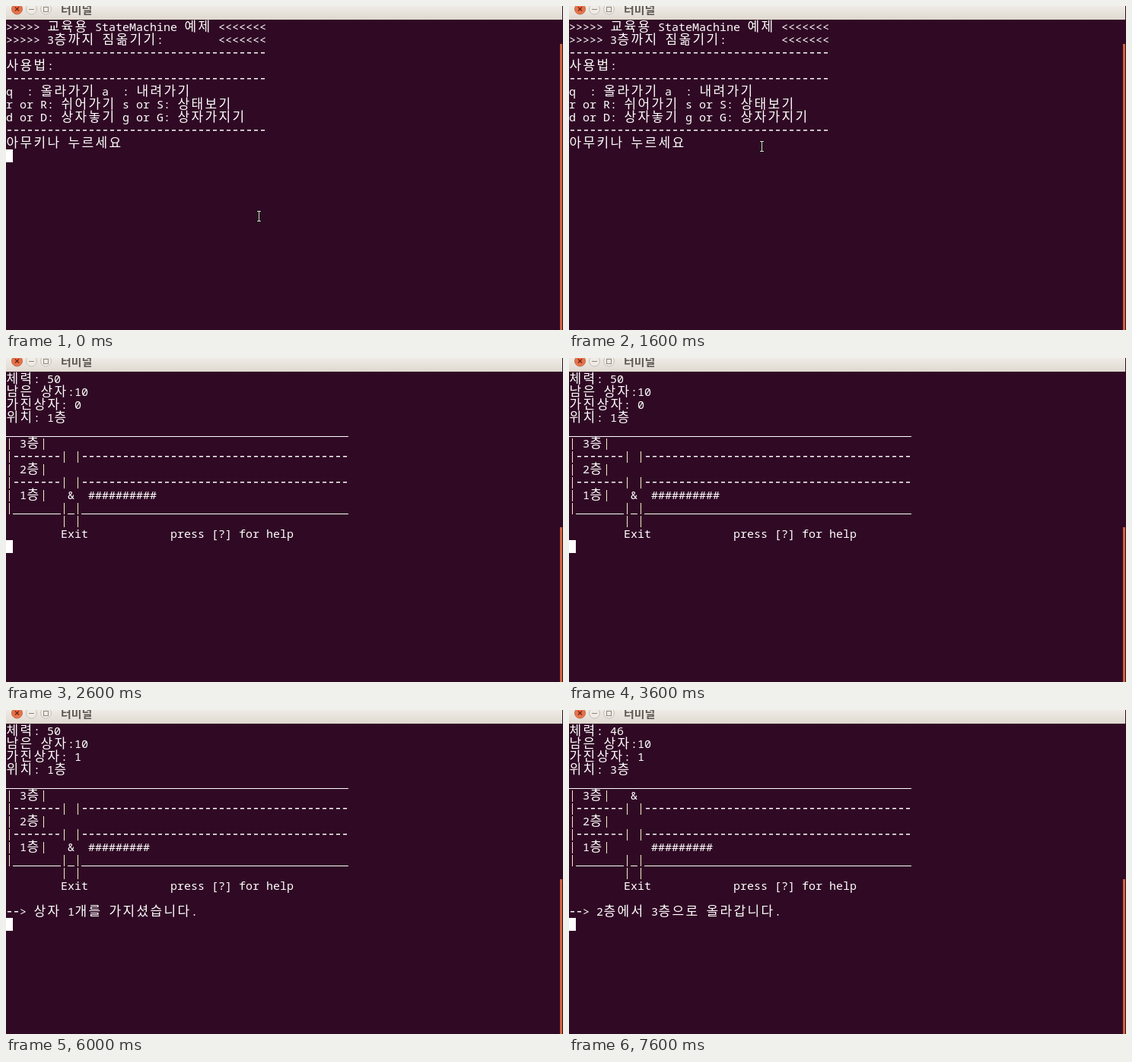
An HTML page with a canvas that plays this animation: 732 by 427 pixels, repeating every 8 s.

```html
<!DOCTYPE html>
<html lang="ko">
<head>
<meta charset="utf-8">
<style>
html, body { margin: 0; width: 100%; height: 100%; overflow: hidden; background: #300a24; }
canvas { display: block; }
</style>
</head>
<body>
<canvas id="stage" width="732" height="427"></canvas>
<script>
const ctx = document.getElementById('stage').getContext('2d');
const LOOP = 8000, CELL = 9, LINE = 17, TOP = 19;
const BG = '#300a24', INK = '#ffffff';
const MONO = '500 15px "Noto Sans Mono", "DejaVu Sans Mono", monospace';
const HANGUL = '500 17px "Noto Sans CJK KR", "Noto Sans CJK", sans-serif';

const rule = '-'.repeat(38);
const intro = [
  '>>>>> 교육용 StateMachine 예제 <<<<<<<',
  '>>>>> 3층까지 짐옮기기:' + ' '.repeat(8) + '<<<<<<<',
  rule,
  '사용법:',
  rule,
  'q  : 올라가기 a  : 내려가기',
  'r or R: 쉬어가기 s or S: 상태보기',
  'd or D: 상자놓기 g or G: 상자가지기',
  rule,
  '아무키나 누르세요'
];

function building({ hp = 50, held = 0, floor = 1, note = '' }) {
  const level = n => `| ${n}층|   ${n === floor ? '&' : ' '}  ` +
    (n === 1 ? '#'.repeat(10 - held) : '');
  const slab = '|-------| |' + '-'.repeat(39);
  const lines = [
    `체력: ${hp}`,
    '남은 상자:10',
    `가진상자: ${held}`,
    `위치: ${floor}층`,
    '_'.repeat(50),
    level(3), slab, level(2), slab, level(1),
    '|_______|_|' + '_'.repeat(39),
    '        | |',
    '        Exit' + ' '.repeat(12) + 'press [?] for help'
  ];
  if (note) lines.push('', '--> ' + note);
  return lines;
}

const screens = [
  [0, intro],
  [2600, building({})],
  [6000, building({ held: 1, note: '상자 1개를 가지셨습니다.' })],
  [7000, building({ hp: 48, held: 1, floor: 2, note: '1층에서 2층으로 올라갑니다.' })],
  [7600, building({ hp: 46, held: 1, floor: 3, note: '2층에서 3층으로 올라갑니다.' })]
];
const typed = [[0, ''], [5400, 'g'], [6000, ''], [6800, 'q'], [7000, ''], [7400, 'q'], [7600, '']];
const blink = [
  [0, 1], [600, 0], [1000, 1], [1600, 0], [2200, 1], [3000, 0], [3600, 1],
  [4200, 0], [4800, 1], [6400, 0], [6800, 1]
];
const pointer = [
  [0, [329, 269]], [200, [329, 271]], [400, [312, 252]],
  [600, [249, 175]], [800, [250, 177]], [2400, null]
];

// Value of the last step that has begun at time t
function at(steps, t) {
  let value;
  for (const [start, v] of steps) if (t >= start) value = v;
  return value;
}

function box(color, x, y, w, h) {
  ctx.fillStyle = color;
  ctx.fillRect(x, y, w, h);
}

function print(text, row) {
  const y = TOP + row * LINE;
  let x = 0;
  for (const ch of text) {
    const wide = ch >= '가' && ch <= '힣';
    if (ch === '_') box(INK, x, y + 16, CELL, 1);
    else if (ch === '|') box('#f6eccb', x + 4, y + 2, 1, 15);
    else if (ch === '-') box(INK, x + 2, y + 8, 5, 1.5);
    else if (ch !== ' ') {
      ctx.fillStyle = INK;
      ctx.font = wide ? HANGUL : MONO;
      ctx.fillText(ch, wide ? x + 0.5 : x, y + 14);
    }
    x += wide ? CELL * 2 : CELL;
  }
  return x;
}

function disc(x, fill, edge) {
  ctx.beginPath();
  ctx.arc(x, 4, 7, 0, Math.PI * 2);
  ctx.fillStyle = fill;
  ctx.fill();
  ctx.strokeStyle = edge;
  ctx.lineWidth = 1;
  ctx.stroke();
}

function titleBar() {
  const shade = ctx.createLinearGradient(0, 0, 0, 18);
  shade.addColorStop(0, '#efebe5');
  shade.addColorStop(1, '#dfd9d0');
  box(shade, 0, 0, 731, 18);
  disc(14.5, '#ea7149', '#b9704f');
  disc(33.5, '#efebe5', '#c4beb5');
  disc(52.5, '#efebe5', '#c4beb5');
  ctx.strokeStyle = '#6f2c18';
  ctx.lineWidth = 1.6;
  ctx.beginPath();
  ctx.moveTo(12, 1.5); ctx.lineTo(17, 6.5);
  ctx.moveTo(17, 1.5); ctx.lineTo(12, 6.5);
  ctx.stroke();
  box('#8a857c', 30, 4, 7, 1);
  ctx.strokeStyle = '#8a857c';
  ctx.lineWidth = 1;
  ctx.strokeRect(49.5, 1.5, 6, 6);
  ctx.fillStyle = '#5d5953';
  ctx.font = 'bold 15px "Noto Sans CJK KR", "Noto Sans CJK", sans-serif';
  ctx.fillText('터미널', 72, 10);
}

function beam([x, y]) {
  const parts = [[1, 1, 5, 1], [3, 2, 1, 12], [1, 14, 5, 1]];
  for (const [dx, dy, w, h] of parts) box('#16070f', x + dx - 1, y + dy - 1, w + 2, h + 2);
  for (const [dx, dy, w, h] of parts) box('#e4e0e2', x + dx, y + dy, w, h);
}

function draw(t) {
  box(BG, 0, 0, 732, 427);
  titleBar();
  const barTop = t < 2400 ? 50 : 223;
  box('#cf653e', 728, barTop, 3, 427 - barTop);

  const lines = at(screens, t);
  lines.forEach(print);
  const end = print(at(typed, t), lines.length);
  if (at(blink, t)) box(INK, end, TOP + lines.length * LINE, CELL, LINE);

  const spot = at(pointer, t);
  if (spot) beam(spot);
}

const begin = performance.now();
function tick() {
  draw((performance.now() - begin) % LOOP);
  requestAnimationFrame(tick);
}
tick();
</script>
</body>
</html>
```
